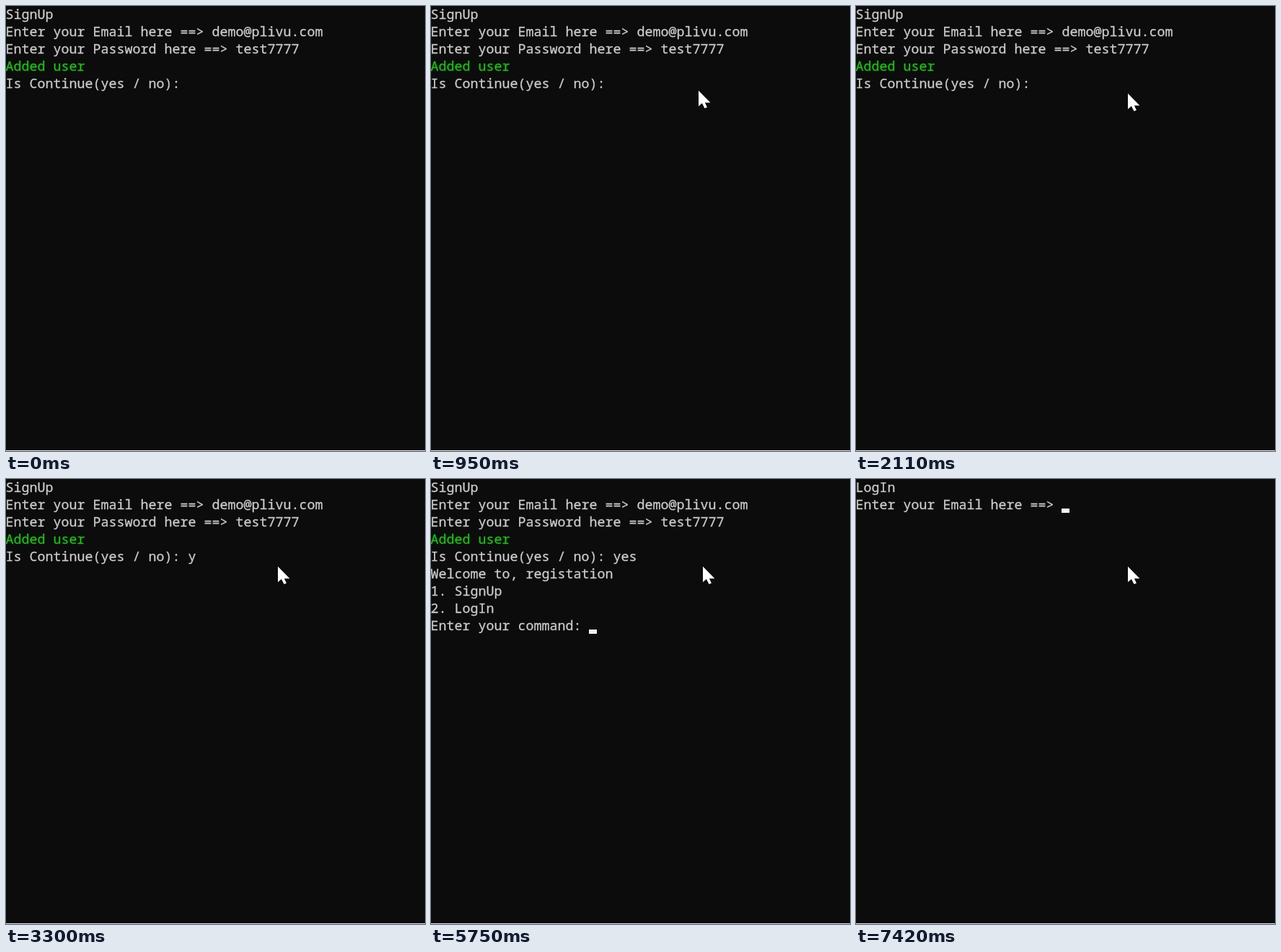
Write an HTML page that moves like this. It is 581 px wide and 618 px high and loops after 8 s.

```html
<!DOCTYPE html>
<html lang="en">
<head>
<meta charset="utf-8">
<title>Terminal sign-up</title>
<style>
  html, body { margin: 0; width: 100%; height: 100%; overflow: hidden; background: #0c0c0c; }
  #stage { position: relative; width: 581px; height: 618px; overflow: hidden; background: #0c0c0c; }
  #stage > * { position: absolute; left: 0; top: 0; }

  /* 11 x 24 px character cells, strokes slightly thickened */
  pre {
    margin: -1px 0 0 -.5px;
    font: 18.333px/24px "Noto Sans Mono", "DejaVu Sans Mono", monospace;
    font-variant-ligatures: none;
    -webkit-text-stroke: .3px currentColor;
    color: #ccc;
  }
  .ok { color: #16c60c; }
  .edge { width: 581px; height: 1px; margin-top: 617px; background: #e6e6e6; }

  .signup, .login, .menu, .choice, .answer, .caret { animation: 8s step-end infinite; }
  .signup { animation-name: signup; }
  .login  { animation-name: login; }
  .menu   { animation-name: menu; }
  .choice { animation-name: choice; }
  .answer { display: inline-block; animation-name: answer; }
  .caret  { width: 11px; height: 6px; background: #f2f2f2; animation-name: caret; }
  .mouse  { width: 17px; height: 25px; overflow: visible; animation: mouse 8s step-end infinite; }

  @keyframes signup { 0% { opacity: 1 } 91.875%, 100% { opacity: 0 } }
  @keyframes login  { 0% { opacity: 0 } 92.75%, 100% { opacity: 1 } }
  @keyframes menu   { 0% { opacity: 0 } 58.625%, 100% { opacity: 1 } }
  @keyframes choice { 0% { opacity: 0 } 85.375%, 100% { opacity: 1 } }

  @keyframes answer {
    0%           { clip-path: inset(0 33px 0 0) }
    41.25%       { clip-path: inset(0 22px 0 0) }
    42.875%      { clip-path: inset(0 11px 0 0) }
    45.5%, 100%  { clip-path: inset(0) }
  }

  @keyframes caret {
    0%      { opacity: 0; transform: translate(252px, 113px) }
    19.75%  { opacity: 1; transform: translate(252px, 113px) }
    26.375% { opacity: 0; transform: translate(252px, 113px) }
    33%     { opacity: 1; transform: translate(252px, 113px) }
    39.625% { opacity: 0; transform: translate(252px, 113px) }
    42.875% { opacity: 1; transform: translate(274px, 113px) }
    45.5%   { opacity: 0; transform: translate(285px, 113px) }
    47.125% { opacity: 1; transform: translate(285px, 113px) }
    52.875% { opacity: 0; transform: translate(285px, 113px) }
    58.625% { opacity: 1; transform: translate(219px, 209px) }
    65.25%  { opacity: 0; transform: translate(219px, 209px) }
    71.875% { opacity: 1; transform: translate(219px, 209px) }
    78.75%  { opacity: 0; transform: translate(219px, 209px) }
    91.125% { opacity: 1; transform: translate(-1px, 233px) }
    91.875% { opacity: 0; transform: translate(-1px, 233px) }
    92.75%, 100% { opacity: 1; transform: translate(285px, 41px) }
  }

  @keyframes mouse {
    0%      { transform: translate(529px, 640px) }
    .875%   { transform: translate(529px, 592px); animation-timing-function: steps(3) }
    3.4%    { transform: translate(470px, 420px); animation-timing-function: steps(3) }
    5.92%   { transform: translate(415px, 260px); animation-timing-function: steps(3) }
    8.44%   { transform: translate(380px, 150px); animation-timing-function: steps(2) }
    10.125% { transform: translate(372px, 122px) }
    11%     { transform: translate(372px, 120px) }
    11.875% { transform: translate(371px, 118px) }
    12.75%  { transform: translate(352px, 98px) }
    13.625% { transform: translate(352px, 98px); animation-timing-function: steps(11) }
    23.875% { transform: translate(373px, 122px); animation-timing-function: steps(3) }
    26.375%, 100% { transform: translate(377px, 122px) }
  }
</style>
</head>
<body>
<div id="stage">
  <pre class="signup">SignUp
Enter your Email here ==> demo@plivu.com
Enter your Password here ==> test7777
<span class="ok">Added user</span>
Is Continue(yes / no): <span class="answer">yes</span>
<span class="menu">Welcome to, registation
1. SignUp
2. LogIn
Enter your command: </span><span class="choice">2</span></pre>
  <pre class="login">LogIn
Enter your Email here ==> </pre>
  <div class="caret"></div>
  <div class="edge"></div>
  <svg class="mouse" viewBox="0 0 17 25">
    <path d="M0 -.6V21.2L4.9 16.9L8.5 24L11.9 22.8L8.9 16.2H16.4Z" fill="#fff"/>
  </svg>
</div>
</body>
</html>
```
